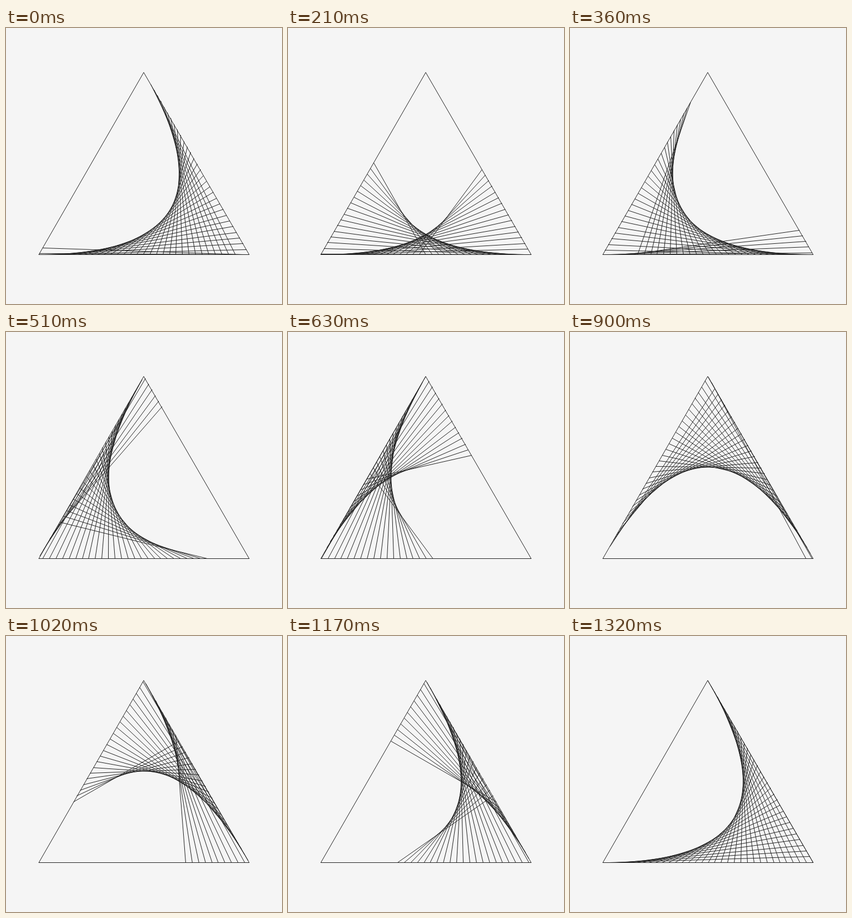
Animation of 500x500 px, one loop 1.35 s. Source, as an HTML page with a canvas:

```html
<!DOCTYPE html>
<html lang="en">
<head>
<meta charset="utf-8">
<title>String triangle</title>
<style>
  html, body { margin: 0; width: 100%; height: 100%; overflow: hidden; background: #f5f5f5; }
  canvas { display: block; }
</style>
</head>
<body>
<canvas id="stage" width="500" height="500"></canvas>
<script>
const ctx = document.getElementById('stage').getContext('2d');
const STEP_MS = 30, STEPS = 45, CHORDS = 32;

// Equilateral triangle of radius 220 around (250, 300): top, right, left.
const half = 220 * Math.sqrt(3) / 2;
const corners = [[249.99, 80.01], [250 + half, 410.01], [250 - half, 410.01]];

// Point on the perimeter; one unit of u is one side.
function pointAt(u) {
  const side = Math.floor(u);
  const part = u - side;
  const a = corners[side % 3], b = corners[(side + 1) % 3];
  return [a[0] + (b[0] - a[0]) * part, a[1] + (b[1] - a[1]) * part];
}

// Endpoints sit on pixel centres.
const snap = v => Math.floor(v) + 0.5;

function chord(u) {
  const [x1, y1] = pointAt(u), [x2, y2] = pointAt(u + 1);
  ctx.beginPath();
  ctx.moveTo(snap(x1), snap(y1));
  ctx.lineTo(snap(x2), snap(y2));
  ctx.stroke();
}

function draw(ms) {
  const step = Math.floor(ms / STEP_MS) % STEPS;
  const start = 3 * (step + 1) / STEPS;
  ctx.fillStyle = '#f5f5f5';
  ctx.fillRect(0, 0, 500, 500);
  ctx.strokeStyle = '#202020';
  ctx.lineWidth = 1;
  ctx.lineCap = 'round';
  for (let side = 0; side < 3; side++) chord(side);
  for (let i = 0; i < CHORDS; i++) chord(start + i / CHORDS);
}

const begin = performance.now();
function tick() {
  draw(performance.now() - begin);
  requestAnimationFrame(tick);
}
tick();
</script>
</body>
</html>
```
